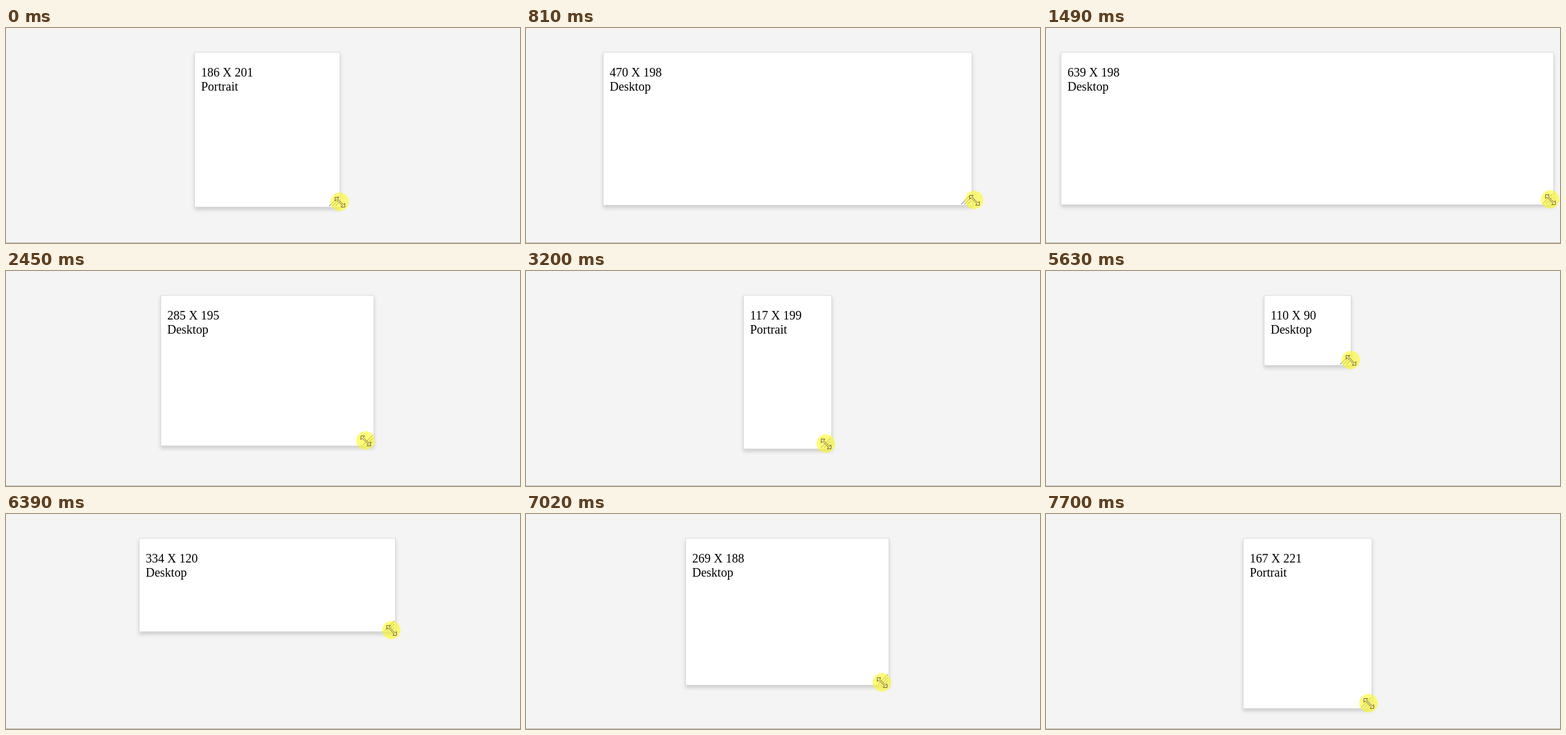
Recreate the animation shown at these times as an HTML page with a canvas. Size 835 by 350 pixels, loop 7830 ms.

```html
<!DOCTYPE html>
<html lang="en">
<head>
<meta charset="utf-8">
<title>Resizable box</title>
<style>
html, body { margin: 0; width: 100%; height: 100%; overflow: hidden; background: #f4f4f4; }
canvas { display: block; }
</style>
</head>
<body>
<canvas id="stage" width="835" height="350"></canvas>
<script>
const ctx = document.getElementById('stage').getContext('2d');
const LOOP = 7830, STEP = 69, JITTER = 15;
const TOP = 39, CENTER = 425, ZOOM = 1.25;
const LABEL_LAG = 28, CURSOR_LEAD = 50;

// The box moves in steps during these spans and rests between them.
const spans = [[0, 1490], [1820, 3530], [3730, 3800], [4330, 7700]];

// Key sizes of the dragged box.
const sizes = [
  { t: -30, w: 234.5, h: 253 },
  { t: 0, w: 237, h: 253 },
  { t: 813, w: 600, h: 250 },
  { t: 1490, w: 801, h: 249 },
  { t: 1760, w: 801, h: 249 },
  { t: 2436, w: 347, h: 246 },
  { t: 3500, w: 117, h: 252 },
  { t: 4330, w: 117, h: 252 },
  { t: 4650, w: 120, h: 125 },
  { t: 5300, w: 122, h: 115 },
  { t: 5637, w: 142, h: 115 },
  { t: 6220, w: 426, h: 145 },
  { t: 6393, w: 417.4, h: 153.4 },
  { t: 6750, w: 381, h: 215 },
  { t: 7700, w: 210, h: 278 }
];

function snap(time) {
  const [start, end] = spans.findLast(span => time >= span[0]);
  const count = Math.round((end - start) / STEP);
  const gap = (end - start) / count;
  return start + gap * Math.min(count, Math.floor((time - start + JITTER) / gap));
}

function slope(key, i) {
  const a = sizes[i], b = sizes[i + 1];
  return a && b ? (b[key] - a[key]) / (b.t - a.t) : 0;
}

function tangent(key, i) {
  const a = slope(key, i - 1), b = slope(key, i);
  return a * b > 0 ? 2 * a * b / (a + b) : 0;
}

// Monotone cubic interpolation: smooth, without overshoot.
function sample(key, time) {
  let i = 0;
  while (i < sizes.length - 2 && time > sizes[i + 1].t) i++;
  const a = sizes[i], b = sizes[i + 1];
  const span = b.t - a.t;
  const u = Math.max(0, Math.min(1, (time - a.t) / span));
  return a[key] + (b[key] - a[key]) * u * u * (3 - 2 * u)
    + span * u * (1 - u) * (tangent(key, i) * (1 - u) - tangent(key, i + 1) * u);
}

function boxAt(time) {
  const width = Math.round(sample('w', time));
  const height = Math.round(sample('h', time));
  const left = Math.floor(CENTER - width / 2);
  return { left, width, height, right: left + width, bottom: TOP + height };
}

function drawBox({ left, width, height }) {
  ctx.save();
  ctx.shadowColor = 'rgba(0, 0, 0, 0.16)';
  ctx.shadowBlur = 6;
  ctx.shadowOffsetY = 4;
  ctx.fillStyle = '#dcdcdc';
  ctx.fillRect(left, TOP, width, height);
  ctx.restore();
  ctx.fillStyle = '#fff';
  ctx.fillRect(left + 1, TOP + 1, width - 2, height - 2);
}

function drawGrip({ right, bottom }) {
  ctx.strokeStyle = '#999';
  ctx.lineWidth = 1.2;
  ctx.beginPath();
  for (let reach = 18; reach >= 8; reach -= 5) {
    ctx.moveTo(right - reach, bottom - 2);
    ctx.lineTo(right - 2, bottom - reach);
  }
  ctx.stroke();
}

function drawLabel(left, time) {
  const measure = key => Math.round((sample(key, time - LABEL_LAG) - 2) / ZOOM);
  const w = measure('w'), h = measure('h');
  ctx.fillStyle = '#000';
  ctx.font = '20px "Liberation Serif", "Times New Roman", serif';
  ctx.fillText(`${w} X ${h}`, left + 11, TOP + 40);
  ctx.fillText(w > h ? 'Desktop' : 'Portrait', left + 11, TOP + 63);
}

function drawCursor(x, y) {
  ctx.save();
  ctx.translate(x, y);
  ctx.fillStyle = 'rgba(255, 250, 20, 0.56)';
  ctx.beginPath();
  ctx.arc(0, 0, 15, 0, Math.PI * 2);
  ctx.fill();

  const half = [[-8, -2], [-8, -8], [-2, -8], [-4, -5.5], [5.5, 4]];
  ctx.translate(0.5, 0.5);
  ctx.beginPath();
  for (const side of [1, -1]) {
    for (const [px, py] of half) ctx.lineTo(px * side, py * side);
  }
  ctx.closePath();
  ctx.fillStyle = 'rgba(255, 255, 190, 0.6)';
  ctx.fill();
  ctx.strokeStyle = '#77601c';
  ctx.lineWidth = 1;
  ctx.stroke();
  ctx.restore();
}

function draw(time) {
  ctx.fillStyle = '#f4f4f4';
  ctx.fillRect(0, 0, 835, 350);
  ctx.fillStyle = '#b8b8b8';
  ctx.fillRect(0, 349, 835, 1);

  const box = boxAt(time);
  drawBox(box);
  drawLabel(box.left, time);
  drawGrip(box);

  // The pointer runs ahead of the corner it drags.
  const ahead = boxAt(time + CURSOR_LEAD);
  drawCursor(ahead.right - 6, ahead.bottom - 9);
}

const begin = performance.now();
function tick() {
  draw(snap((performance.now() - begin) % LOOP));
  requestAnimationFrame(tick);
}
tick();
</script>
</body>
</html>
```
